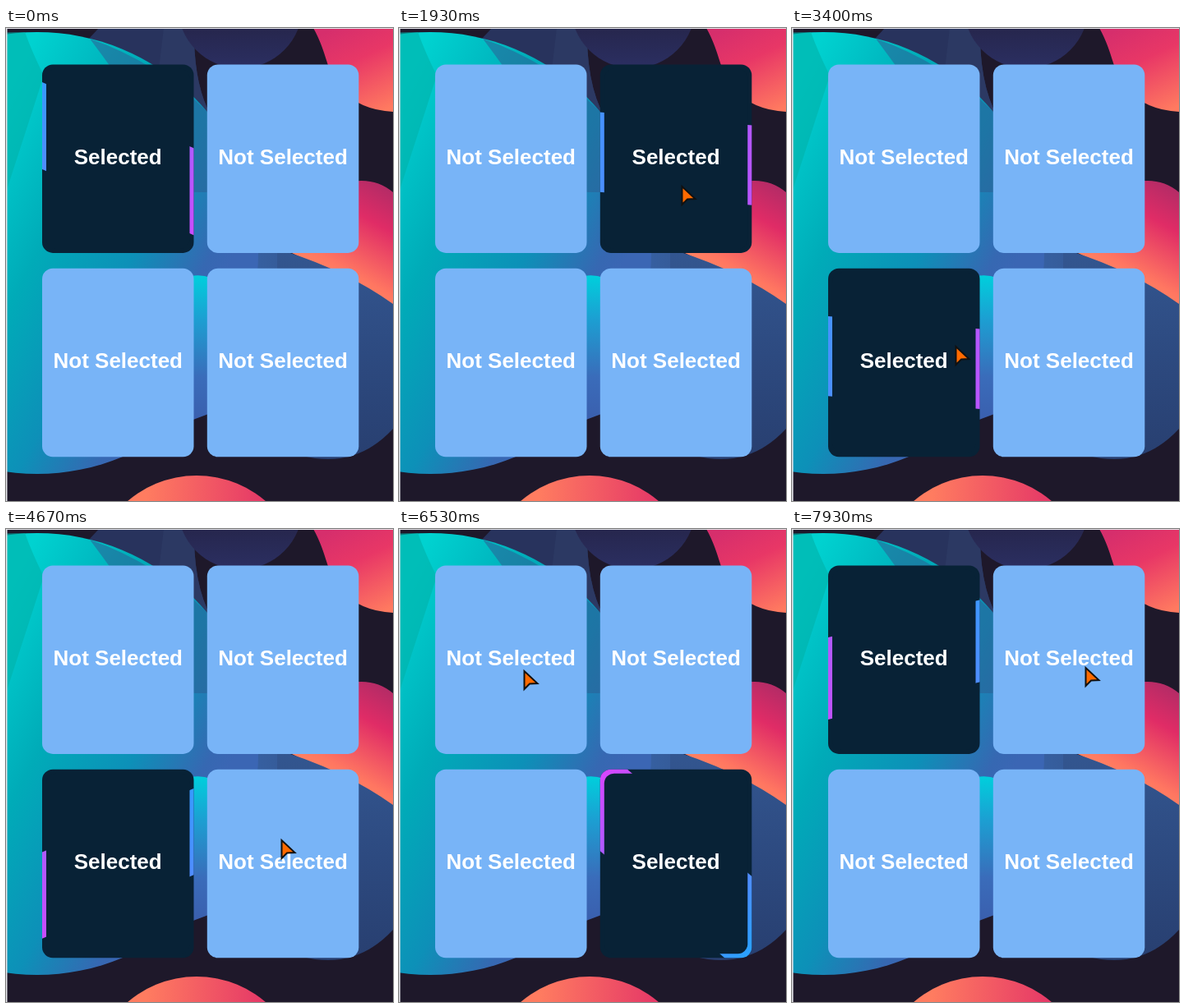
An HTML page for the animation above (8000 ms loop, 471 px wide and 576 px high).

```html
<!DOCTYPE html>
<html lang="en">
<head>
<meta charset="utf-8">
<title>Card selection</title>
<style>
  html, body { margin: 0; width: 100%; height: 100%; overflow: hidden; background: #1e182a; }
  svg { display: block; }
  text { font: bold 26px "Liberation Sans", Arial, sans-serif; fill: #fff; text-anchor: middle; }
</style>
</head>
<body>
<svg width="471" height="576" viewBox="0 0 471 576">
  <defs>
    <linearGradient id="teal" gradientUnits="userSpaceOnUse" x1="20" y1="40" x2="320" y2="200">
      <stop offset="0" stop-color="#00d2d0"/>
      <stop offset=".37" stop-color="#00abb8"/>
      <stop offset=".68" stop-color="#0d90b8"/>
      <stop offset=".92" stop-color="#3668b2"/>
      <stop offset="1.1" stop-color="#3b66b4"/>
    </linearGradient>
    <linearGradient id="row" gradientUnits="userSpaceOnUse" x1="230" y1="0" x2="345" y2="0">
      <stop offset="0" stop-color="#386ab2"/>
      <stop offset="1" stop-color="#355a97"/>
    </linearGradient>
    <linearGradient id="cyan" x2="0" y2="1">
      <stop offset="0" stop-color="#00cfdc"/>
      <stop offset=".3" stop-color="#1c9fd2"/>
      <stop offset=".7" stop-color="#3a6cba"/>
      <stop offset="1" stop-color="#3a5fae"/>
    </linearGradient>
    <linearGradient id="navy" x2="0" y2="1">
      <stop offset=".6" stop-color="#252448"/>
      <stop offset="1" stop-color="#2b2f62"/>
    </linearGradient>
    <linearGradient id="slate" x2="0" y2="1">
      <stop offset="0" stop-color="#335690"/>
      <stop offset=".5" stop-color="#2d4a80"/>
      <stop offset="1" stop-color="#283f70"/>
    </linearGradient>
    <linearGradient id="coral" gradientUnits="userSpaceOnUse" x1="400" y1="0" x2="450" y2="105">
      <stop offset="0" stop-color="#d62e6c"/>
      <stop offset=".4" stop-color="#e83766"/>
      <stop offset="1" stop-color="#ff7a60"/>
    </linearGradient>
    <linearGradient id="ember" gradientUnits="userSpaceOnUse" x1="450" y1="185" x2="385" y2="300">
      <stop offset="0" stop-color="#b32b66"/>
      <stop offset=".35" stop-color="#e02c66"/>
      <stop offset=".85" stop-color="#ff7661"/>
      <stop offset="1" stop-color="#ff8562"/>
    </linearGradient>
    <linearGradient id="sunrise" gradientUnits="userSpaceOnUse" x1="170" y1="570" x2="310" y2="576">
      <stop offset="0" stop-color="#ff7c60"/>
      <stop offset="1" stop-color="#e63a67"/>
    </linearGradient>
    <linearGradient id="beam" x2="0" y2="1">
      <stop offset="0" stop-color="#00b7ff"/>
      <stop offset="1" stop-color="#ff30ff"/>
    </linearGradient>
    <clipPath id="frame"><rect width="184.5" height="229.5" rx="13"/></clipPath>
  </defs>

  <!-- backdrop -->
  <rect width="471" height="576" fill="#1e182a"/>
  <path d="M113 0H229Q228 60 245 98V140H100V14Z" fill="#28335d"/>
  <path d="M192 0H229Q228 60 245 98V140H175Z" fill="#2c3963"/>
  <circle cx="285" cy="-27" r="76" fill="url(#navy)"/>
  <path d="M240 270H345L345 300H240Z" fill="url(#row)"/>
  <circle cx="38" cy="274" r="269" fill="url(#teal)"/>
  <path d="M0 5.5L23 5Q32 30 46 58L0 200Z" fill="#00b4ac" opacity=".65"/>
  <path d="M102 13Q185 42 245 102V200H229Q160 90 102 13Z" fill="#2d5f96" opacity=".55"/>
  <path d="M225 302Q238 300 249 304V469L225 478Z" fill="url(#cyan)"/>
  <path d="M374 0H471V102Q430 100 406 73C390 53 391 30 374 0Z" fill="url(#coral)"/>
  <path d="M340 270L420 187Q450 182 471 200V340L400 300Z" fill="url(#ember)"/>
  <path d="M340 272Q415 296 471 336V488Q437 525 392 525Q360 525 330 508V272Z" fill="url(#slate)"/>
  <circle cx="232" cy="674" r="129" fill="url(#sunrise)"/>
  <path d="M0 0H471V1H1.5V576H0Z" fill="#e4e4e8"/>

  <g id="cards"></g>
  <path id="cursor" d="M1.5 2V24L8 17.5L17.5 17Z" fill="#ff6a00" stroke="#111" stroke-width="2"/>
</svg>
<script>
const LOOP = 8000, SPIN = 3000, START_ANGLE = 270;
const W = 184.5, H = 229.5, BEAM_W = 97, BEAM_H = H * 1.8;

// [time, card]
const selections = [[-195, 0], [1890, 1], [3361, 2], [4692, 3], [6547, 0]];

// [time, x, y]
const cursorKeys = [
  [850, 394, 240], [960, 388, 271], [1200, 361, 225], [1700, 343, 191], [1950, 343, 191],
  [2600, 215, 428], [3200, 198, 386], [3500, 198, 386], [4330, 333, 511], [4640, 334, 377],
  [4760, 334, 377], [5200, 416, 440], [5950, 151, 171], [6620, 151, 171], [7500, 356, 167]
];

const cardLayer = document.getElementById('cards');
const cursor = document.getElementById('cursor');

cardLayer.innerHTML = [[44, 44.4], [244.8, 44.4], [44, 292.7], [244.8, 292.7]].map(([x, y]) => `
  <g transform="translate(${x} ${y})">
    <rect class="base" width="${W}" height="${H}" rx="13"/>
    <g class="glow">
      <g clip-path="url(#frame)">
        <rect class="beam" x="${(W - BEAM_W) / 2}" y="${(H - BEAM_H) / 2}"
          width="${BEAM_W}" height="${BEAM_H}" fill="url(#beam)"/>
      </g>
      <rect x="5" y="5" width="${W - 10}" height="${H - 10}" rx="12" fill="#082236"/>
    </g>
    <text x="${W / 2}" y="121.5"></text>
  </g>`).join('');

const cards = [...cardLayer.children].map(card => ({
  base: card.querySelector('.base'),
  glow: card.querySelector('.glow'),
  beam: card.querySelector('.beam'),
  label: card.querySelector('text')
}));

function drawCards(t) {
  const [since, active] = selections.findLast(([start]) => start <= t);
  const angle = START_ANGLE + (t - since) / SPIN * 360;
  cards.forEach((card, i) => {
    const on = i === active;
    card.base.setAttribute('fill', on ? '#082236' : '#78b4f7');
    card.glow.setAttribute('visibility', on ? 'visible' : 'hidden');
    card.beam.setAttribute('transform', `rotate(${angle} ${W / 2} ${H / 2})`);
    card.label.textContent = on ? 'Selected' : 'Not Selected';
  });
}

function drawCursor(t) {
  const next = cursorKeys.findIndex(([time]) => time > t);
  cursor.setAttribute('visibility', next === 0 ? 'hidden' : 'visible');
  if (next === 0) return;
  const to = next < 0 ? cursorKeys.at(-1) : cursorKeys[next];
  const from = next < 0 ? to : cursorKeys[next - 1];
  const p = next < 0 ? 0 : (t - from[0]) / (to[0] - from[0]);
  const eased = p * p * (3 - 2 * p);
  const [x, y] = [1, 2].map(k => from[k] + (to[k] - from[k]) * eased);
  cursor.setAttribute('transform', `translate(${x} ${y})`);
}

const startTime = performance.now();
function tick() {
  const t = (performance.now() - startTime) % LOOP;
  drawCards(t);
  drawCursor(t);
  requestAnimationFrame(tick);
}
tick();
</script>
</body>
</html>
```
